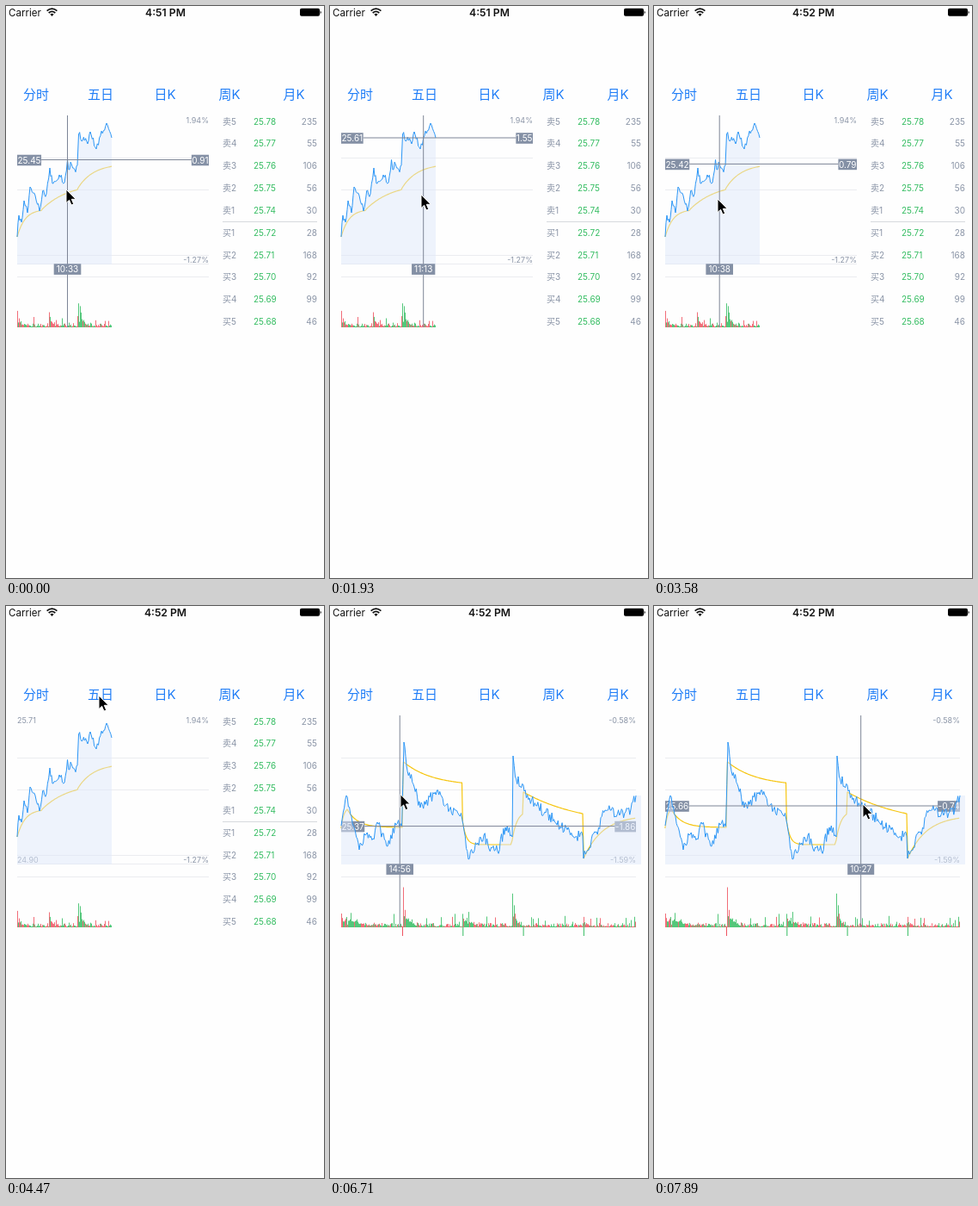
Animation, 370 px wide and 664 px high, one loop 8 s. Source, as an HTML page:

```html
<!DOCTYPE html>
<html lang="zh">
<head>
<meta charset="utf-8">
<style>
  html, body { margin: 0; width: 100%; height: 100%; overflow: hidden; background: #fefefe; }
  svg { display: block; width: 370px; height: 664px; font-family: Inter, "Noto Sans CJK SC", "Noto Sans CJK", sans-serif; }
</style>
</head>
<body>
<svg id="stage" viewBox="0 0 370 664"></svg>
<script>
const LOOP = 8000, TICK = 148.9;
const GRAY = '#8b95a7', BOX = '#8490a5', RED = '#ef5360', GREEN = '#35bd62', BLUE = '#2b96f6';
const stage = document.getElementById('stage');

const text = (x, y, s, size, fill, anchor = 'start', extra = '') =>
  `<text x="${x}" y="${y}" font-size="${size}" fill="${fill}" text-anchor="${anchor}" ${extra}>${s}</text>`;
const stroke = (d, color, width = 1) =>
  `<path d="${d}" stroke="${color}" stroke-width="${width}" fill="none" stroke-linejoin="round"/>`;
const path = pts => 'M' + pts.map(p => p[0].toFixed(2) + ' ' + p[1].toFixed(2)).join('L');
const mix = (a, b, u) => a + (b - a) * u;

function seeded(seed) {
  return () => (seed = (seed * 16807) % 2147483647) / 2147483647;
}
const rand = seeded(4127);

// Price line: straight runs between turning points, roughened in between
function priceLine(turns, rough) {
  const pts = [turns[0]];
  for (let i = 1; i < turns.length; i++) {
    const [ax, ay] = turns[i - 1], [bx, by] = turns[i];
    const n = Math.max(1, Math.round((bx - ax) / 1.2));
    for (let j = 1; j < n; j++)
      pts.push([mix(ax, bx, j / n), mix(ay, by, j / n) + (rand() - .5) * rough]);
    pts.push(turns[i]);
  }
  return pts;
}

function heightAt(pts, x) {
  const i = Math.max(1, pts.findIndex(p => p[0] >= x));
  const [ax, ay] = pts[i - 1], [bx, by] = pts[i];
  return mix(ay, by, (x - ax) / (bx - ax));
}

// Average line: each leg [x, from, to, decay] settles exponentially
function averageLine(legs, end) {
  const pts = [];
  legs.forEach(([x0, from, to, decay], i) => {
    const x1 = i + 1 < legs.length ? legs[i + 1][0] - .8 : end;
    for (let x = x0; x <= x1; x++) pts.push([x, to + (from - to) * Math.exp((x0 - x) / decay)]);
  });
  return pts;
}

// Volume bars: a noisy floor plus decaying bursts [x, height, decay]
function volume(pts, end, bursts) {
  const d = { [RED]: '', [GREEN]: '' };
  for (let x = 13.5; x < end; x++) {
    let h = 1 + 4 * rand() ** 2 + (rand() < .06 ? 12 * rand() : 0);
    for (const [bx, top, decay] of bursts)
      if (x >= bx) h += top * Math.exp((bx - x) / decay) * (x - bx < 1 ? 1 : .2 + .8 * rand());
    const up = heightAt(pts, x + .4) < heightAt(pts, x - .4);
    d[up !== rand() < .25 ? RED : GREEN] += `M${x} 373v${-Math.min(h, 50).toFixed(1)}`;
  }
  return stroke(d[RED], RED, .85) + stroke(d[GREEN], GREEN, .85);
}

function clock(minutes) {
  const t = 570 + minutes + (minutes > 120 ? 90 : 0);
  return [Math.floor(t / 60), t % 60].map(n => String(n).padStart(2, '0')).join(':');
}

const day = {
  right: 236, end: 123, fillEnd: 123, grid: [176.5, 213.5, 289.5, 299.5, 314.5],
  high: '25.71', top: '1.94%', bottom: '-1.27%', base: 25.22,
  pts: priceLine([
    [13, 268], [15, 243], [18, 251], [21, 226], [25, 240], [28, 210], [34, 220], [39, 238], [42.7, 214.5], [47, 218],
    [51, 188], [54, 206], [62, 196], [68, 205], [71.5, 178.5], [73, 190], [76.2, 183.4], [80, 190], [83, 185],
    [84.5, 149], [95, 160], [98, 146], [105, 166], [108.7, 153], [117, 136], [123, 153]
  ], 9),
  avg: [[13, 268, 236, 9], [42, 236, 205, 31], [84, 211, 183, 18]],
  bursts: [[13.5, 18, 3], [50, 18, 3], [83.8, 24, 3], [85.8, 26, 3]],
  price: y => 25.45 - (y - 178.5) / 162,
  minute: x => Math.round((x - 13) * 240 / 223)
};
const week = {
  right: 356, end: 356, fillEnd: 362, grid: [176.5, 213.5, 289.5, 314.5],
  high: '26.80', top: '-0.58%', bottom: '-1.59%', base: 25.85,
  pts: priceLine([
    [13, 255], [19, 220], [25, 244], [34, 283], [41, 266], [50, 270], [55, 251], [67, 279], [77, 254], [83.5, 256],
    [86, 158], [89, 185], [98, 210], [105, 234], [121, 218], [130, 221], [139, 236], [153.7, 247], [161, 294],
    [179, 266], [185, 282], [195, 285], [204, 257], [212, 268], [213, 174], [215.5, 198], [226, 215], [240.7, 232],
    [251, 240], [282, 267], [294, 267], [295, 293], [310, 262], [320, 237], [338, 241], [350, 236], [356, 220]
  ], 13),
  avg: [[13, 258, 234, 3], [20, 236, 257, 12], [85.5, 181, 209, 34], [154.3, 250, 277, 4],
    [212, 272, 238, 5.5], [225, 216, 256, 70], [295.2, 293, 243, 22]],
  bursts: [[13, 15, 16], [85, 47, 5], [154, 15, 8], [212, 44, 3.5], [295, 13, 3], [354, 13, 2]],
  price: y => 24.9 + (295 - y) / 83.2,
  minute: x => Math.round((x - 13) % 70.4 / .2893)
};

const back = c => c.grid.map(y => stroke(`M13 ${y}H${c.right}`, '#ebecf0')).join('')
  + text(c.right, 136, c.top, 9, GRAY, 'end') + text(c.right, 298, c.bottom, 9, GRAY, 'end')
  + stroke(path(averageLine(c.avg, c.end)), '#f6c50f', 1.2);
const left = c => text(13, 136, c.high, 9, GRAY) + text(13, 298, '24.90', 9, GRAY);
const front = c =>
  `<path d="${path(c.pts)}H${c.fillEnd}V300H13Z" fill="#dfeafc" fill-opacity=".5"/>`
  + stroke(path(c.pts), BLUE) + volume(c.pts, c.end, c.bursts);

const dayEnds = [0, 1, 2, 3].map(i => stroke(`M${84.5 + i * 70.3} 373v10`, i ? GREEN : RED)).join('');
const book = [235, 55, 106, 56, 30, 28, 168, 92, 99, 46].map((quantity, i) => {
  const sell = i < 5, y = 137.6 + i * 25.83;
  return text(252, y, sell ? '卖' + (5 - i) : '买' + (i - 4), 10, GRAY)
    + text(288, y, (25.78 - i * .01 - (sell ? 0 : .01)).toFixed(2), 10, GREEN)
    + text(362, y, quantity, 10, GRAY, 'end');
}).join('') + stroke('M252 250.5H362', '#d6d9de');
const dates = ['06-28', '06-29', '06-30', '07-01', '07-04']
  .map((s, i) => text(46.6 + i * 68.6, 309.5, s, 10, GRAY, 'middle')).join('');
const tabs = ['分时', '五日', '日K', '周K', '月K']
  .map((s, i) => text(35 + i * 75, 108, s, 15, '#1f7df7', 'middle', `id="tab${i}"`)).join('');
const tag = id => `<rect id="${id}Box" fill="${BOX}"/><text id="${id}" font-size="10" fill="#fff"/>`;

stage.innerHTML = `
  ${text(3, 11.5, 'Carrier', 11.6, '#111')}
  ${stroke('M47.6 5.6Q53.5 .6 59.4 5.6M49.7 8Q53.5 4.6 57.3 8', '#111', 1.7)}
  <path d="M51.4 9.6Q53.5 7.8 55.6 9.6L53.5 12Z" fill="#111"/>
  ${text(185.5, 11.6, '', 12.2, '#111', 'middle', 'id="now" font-weight="600"')}
  <rect x="342" y="2.8" width="23" height="9" rx="1.8"/><path d="M365.6 5.4q2.4 1.9 0 3.8Z"/>
  ${tabs}
  <g id="dayBack">${back(day)}${book}</g><g id="dayLeft">${left(day)}</g>
  <g id="weekBack">${back(week)}</g><g id="weekLeft">${left(week)}${dates}</g>
  <g id="values">${tag('price')}${tag('change')}</g>
  <g id="dayFront">${front(day)}</g><g id="weekFront">${front(week)}${dayEnds}</g>
  <g id="cross"><path id="hair" stroke="#7d8596" fill="none"/>${tag('time')}</g>
  <path id="cursor" d="M0 0V15.6L3.6 12.3L6 18L8.7 16.8L6.3 11.3H11.2Z" stroke="#fff"/>`;

const el = id => document.getElementById(id);
const show = (id, on) => el(id).setAttribute('display', on ? 'inline' : 'none');
const set = (node, attrs) => { for (const k in attrs) node.setAttribute(k, attrs[k]); };

// align: 0 starts at x, .5 centres on x, 1 ends at x; returns the width
function putTag(id, s, x, y, pad, align) {
  const t = el(id);
  t.textContent = s;
  const w = t.getComputedTextLength() + pad, x0 = x - w * align;
  set(t, { x: x0 + pad / 2, y: y + 3.7 });
  set(el(id + 'Box'), { x: x0, y: y - 6.3, width: w, height: 12.6 });
  return w;
}

// Moves [first tick, last tick, cursor x, cursor y, crosshair x], resting in between
const START = [70, 213, 71.5];
const MOVES = [
  [1, 8, 43, 231, 42.7], [8, 13, 106, 219, 108.7], [20, 24, 74, 224, 76.2], [25, 30, 108, 104, 76.2],
  [32, 36, 45.5, 217, 45], [43, 49, 155, 222, 153.7], [49, 53, 243, 230, 240.7]
];
function poseAt(k) {
  let pose = START;
  for (const [from, to, ...next] of MOVES) {
    const u = Math.min(1, Math.max(0, (k - from) / (to - from)));
    pose = pose.map((v, i) => mix(v, next[i], u));
  }
  return pose;
}

function draw(ms) {
  const k = Math.floor((ms + 12) / TICK);
  const inWeek = k >= 32, held = k < 26 || k >= 41;
  const c = inWeek ? week : day;
  const [cx, cy, x] = poseAt(k);
  el('now').textContent = k < 23 ? '4:51 PM' : '4:52 PM';
  el('tab1').setAttribute('opacity', k === 31 ? .25 : k === 32 ? .6 : 1);
  for (const part of ['Back', 'Front']) {
    show('day' + part, !inWeek);
    show('week' + part, inWeek);
  }
  show('dayLeft', !inWeek && !held);
  show('weekLeft', inWeek && !held);
  show('values', held);
  show('cross', held);
  el('cursor').setAttribute('transform', `translate(${cx} ${cy})`);
  if (!held) return;
  const y = heightAt(c.pts, x), price = c.price(y).toFixed(2);
  const lw = putTag('price', price, 13, y + .5, 1, 0);
  const rw = putTag('change', ((price / c.base - 1) * 100).toFixed(2), c.right, y + .5, 1, 1);
  putTag('time', clock(c.minute(x)), x, 305.6, 6, .5);
  el('hair').setAttribute('d', `M${x} 127V373M${13 + lw} ${y}H${c.right - rw}`);
}

function loop() {
  draw(performance.now() % LOOP);
  requestAnimationFrame(loop);
}
loop();
</script>
</body>
</html>
```
